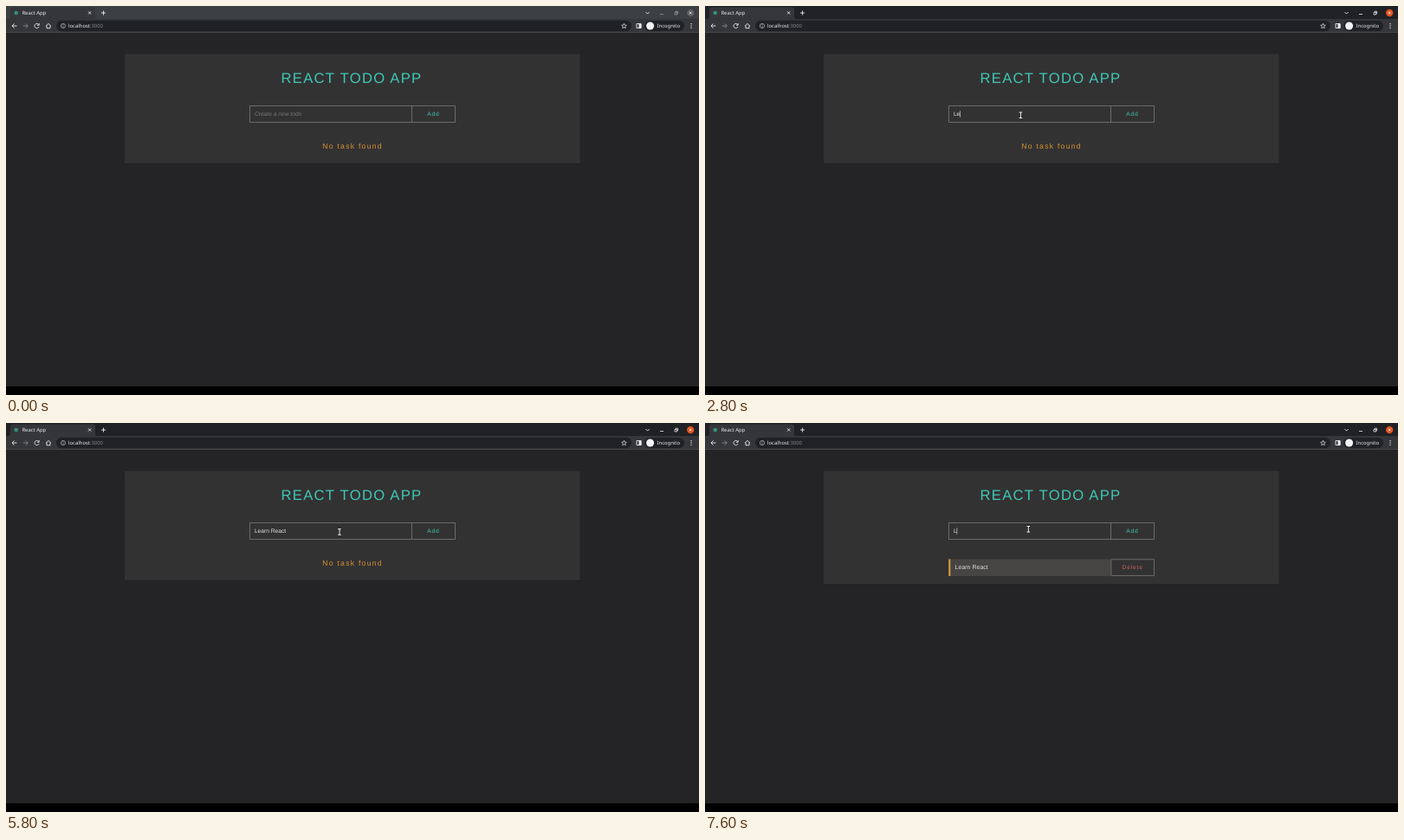
Animation, 800 px wide and 450 px high, one loop 8000 ms. Source, as an HTML page:

```html
<!DOCTYPE html>
<html lang="en">
<head>
<meta charset="utf-8">
<title>Todo app</title>
<style>
  html, body { margin: 0; width: 100%; height: 100%; overflow: hidden; background: #000; }
  svg { display: block; width: 800px; height: 450px; }
  text { white-space: pre; text-rendering: geometricPrecision; }
  .page { font: 6.67px "Liberation Sans", Arial, sans-serif; }
  .chrome { font: 5.9px "Noto Sans", sans-serif; fill: #e8eaed; }
  .spaced { letter-spacing: .83px; }
  .wide { letter-spacing: 1.25px; }
  .icon { fill: none; stroke: #e8eaed; stroke-width: .9; }
  .box { fill: none; stroke: #7b7a7b; stroke-width: .8; }
</style>
</head>
<body>
<svg viewBox="0 0 800 450">
  <rect width="800" height="440" fill="#242325"/>

  <g class="chrome">
    <rect id="strip" width="800" height="16"/>
    <path d="M3 15.5Q5 15 5 12V4Q5 1.500 8 1.500H100Q103 1.500 103 4V12Q103 15 105 15.500Z" fill="#35363a"/>
    <rect y="15" width="800" height="16" fill="#35363a"/>
    <rect y="30.300" width="800" height=".7" fill="#4a4c50"/>
    <rect x="58" y="16.800" width="664" height="12.400" rx="6.200" fill="#202124"/>
    <rect x="737" y="17" width="46" height="12" rx="6" fill="#202124"/>
    <circle cx="11.700" cy="8" r="2.300" fill="#36907f"/>
    <text x="18.400" y="10">React App</text>
    <text x="72" y="25">localhost<tspan fill="#85888c">:3000</tspan></text>
    <text x="751.500" y="25">Incognito</text>
    <circle cx="743.600" cy="23" r="4.500" fill="#f1f3f4"/>
    <g class="icon">
      <path d="M95 6.300l3.200 3.200m0-3.200l-3.200 3.200M110 8h5m-2.500-2.500v5"/>
      <path d="M12.500 23h-5.500m2.600-2.600l-2.600 2.600l2.600 2.600"/>
      <path d="M19.800 23h5.500m-2.600-2.600l2.600 2.600l-2.600 2.600" stroke="#85888c"/>
      <path d="M37.700 21.500A2.600 2.600 0 1 0 38 24M38.200 20v2.200h-2.200"/>
      <path d="M46 23.200l3-2.800l3 2.800M47 22.700v3h4v-3"/>
      <path d="M66 22.600v2M66 21v.8M68.600 23A2.600 2.600 0 1 1 63.400 23A2.600 2.600 0 1 1 68.600 23" stroke-width=".7" stroke="#bdc1c6"/>
      <path d="M713.500 20.200l.8 1.900 2 .2-1.500 1.400.4 2-1.700-1-1.700 1 .4-2-1.500-1.400 2-.2z" stroke-width=".7"/>
      <path d="M728 20.500h5v5h-5z"/>
      <path d="M731 20.500h2v5h-2z" fill="#e8eaed"/>
      <path d="M791 20.100v1.200m0 1.200v1.200m0 1.200v1.200" stroke-width="1.200"/>
      <path d="M738.500 7l2.100 2.100 2.100-2.100"/>
    </g>
    <g id="buttons" class="icon">
      <path d="M755 9.500h4M772 7.500h2.500v2.500h-2.500zM773 7v-.8h2.600v2.600h-.8" stroke-width=".8"/>
    </g>
    <circle id="close" cx="790.200" cy="8" r="4.200"/>
    <path class="icon" d="M788.800 6.600l2.800 2.800m0-2.800l-2.800 2.800" stroke-width=".8"/>
  </g>

  <g class="page">
    <rect x="137" y="59" width="526" height="126" id="shadow" fill="#1e1d1f" opacity=".45"/>
    <rect x="137" y="55.500" width="525.500" height="126.300" id="card" fill="#333233"/>
    <text class="wide" x="317.600" y="88.700" font-size="16.670" fill="#3fc8b4">REACT TODO APP</text>
    <path class="box" d="M281.500 115.500h237v19h-237zM468.500 115.500v19"/>
    <text id="hint" x="286.900" y="127.300" font-style="italic" fill="#767576">Create a new todo</text>
    <text id="entry" x="286.900" y="127.300" fill="#e4e4e4"></text>
    <rect id="caret" y="121.300" width=".6" height="7.400" fill="#eee"/>
    <text class="spaced" x="486.300" y="127.400" fill="#3fc8b4">Add</text>
    <text id="empty" class="wide" x="365.200" y="165" font-size="8.670" fill="#d3932f">No task found</text>
    <g id="task">
      <rect x="281.300" y="157.500" width="187.200" height="19.500" fill="#474543"/>
      <rect x="281.300" y="157.500" width="2" height="19.500" fill="#dba03a"/>
      <path class="box" d="M468.900 157.800h49.600v18.800h-49.600z"/>
      <text x="288.600" y="169.300" font-size="7" fill="#dedede">Learn React</text>
      <text class="spaced" x="481.500" y="169.400" fill="#d05f66">Delete</text>
    </g>
  </g>

  <g id="pointer" stroke-linejoin="round">
    <path id="arrow" d="M0 0v7l1.700-1.500 1.200 2.600 1.200-.6-1.200-2.500h2.300z" fill="#111" stroke="#fff" stroke-width=".6"/>
    <g id="beam" fill="none">
      <path d="M-1.800-3.300h3.600M0-3.300v6.600M-1.800 3.300h3.600" stroke="#111" stroke-width="1.800"/>
      <path d="M-1.800-3.300h3.600M0-3.300v6.600M-1.800 3.300h3.600" stroke="#fff" stroke-width="1"/>
    </g>
    <path id="hand" d="M-1-3.500q.7-.7 1.200 0v2.500l2.600.7q.6.300.4 1.200l-.7 2.600h-3l-2-2.800q0-.9.700-.7l.8.500z" fill="#fff" stroke="#222" stroke-width=".5"/>
  </g>
</svg>
<script>
const $ = id => document.getElementById(id);
const show = (id, on) => $(id).style.display = on ? "" : "none";

const LOOP = 8000, STEP = 200, FOCUS = 1600, ADDED = 6600, REFOCUS = 7200;
const TASK = "Learn React";
const keys = [2400, 2800, 3000, 3200, 3400, 3600, 4200, 4400, 4600, 5000, 5200, 7600];

// time, x, y, shape
const moves = [
  [800, 420, 170, "arrow"], [1000, 390, 148, "arrow"], [1200, 361, 131, "beam"],
  [1400, 353, 129, "beam"], [1800, 364.400, 126.300, "beam"],
  [5800, 385, 126, "beam"], [6000, 440, 128, "beam"], [6200, 485, 129.500, "hand"],
  [6400, 489.500, 129.800, "hand"], [6800, 484, 129, "hand"],
  [7000, 420, 125, "beam"], [7200, 373.300, 122.800, "beam"]
];

function draw(t) {
  const active = t >= FOCUS, added = t >= ADDED;
  $("strip").setAttribute("fill", active ? "#202124" : "#3c4043");
  $("close").setAttribute("fill", active ? "#e0531f" : "#5b5e62");
  $("buttons").setAttribute("opacity", active ? 1 : .5);

  const pressed = keys.filter(k => k <= t && (!added || k > ADDED));
  const entry = $("entry");
  entry.textContent = TASK.slice(0, pressed.length);
  show("hint", !pressed.length);

  // The caret restarts its blink on focus and on every key.
  const since = t - Math.max(added ? REFOCUS : FOCUS, ...pressed);
  show("caret", since >= 0 && since % 1000 < 600);
  const width = pressed.length ? entry.getComputedTextLength() : 0;
  $("caret").setAttribute("x", 286.900 + width);

  show("empty", !added);
  show("task", added);
  $("card").setAttribute("height", added ? 130.800 : 126.300);
  $("shadow").setAttribute("height", added ? 128.500 : 124);

  const pose = moves.filter(m => m[0] <= t).pop();
  show("pointer", pose);
  if (pose) {
    const [, x, y, shape] = pose;
    $("pointer").setAttribute("transform", `translate(${x} ${y})`);
    for (const id of ["arrow", "beam", "hand"]) show(id, id === shape);
  }
}

const start = performance.now();
function tick() {
  const t = (performance.now() - start) % LOOP;
  draw(Math.floor(t / STEP) * STEP);
  requestAnimationFrame(tick);
}
tick();
</script>
</body>
</html>
```
